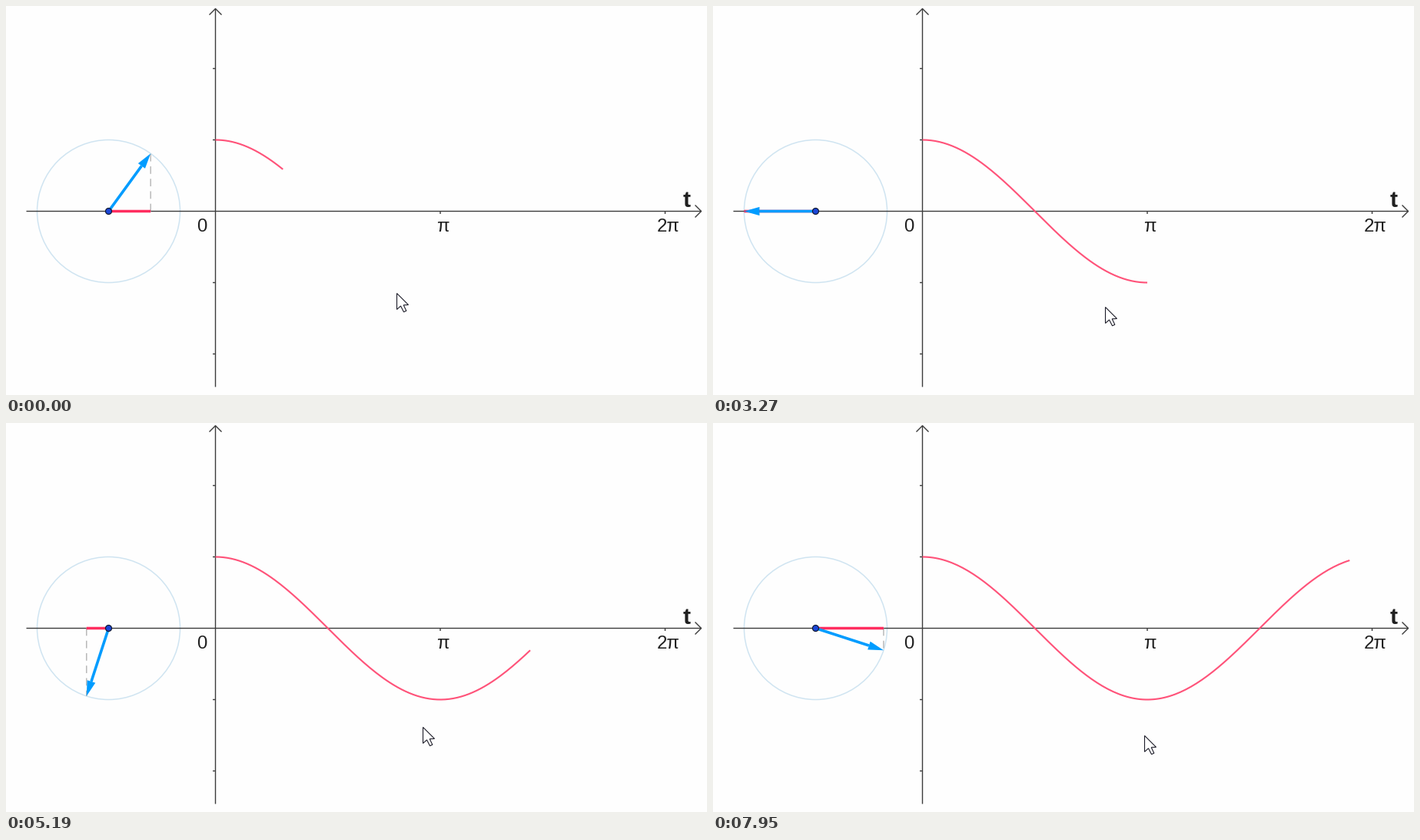
These frames come from a looping animation (912 px wide and 507 px high, 8000 ms). A matplotlib script:

```python
import numpy as np
import matplotlib.pyplot as plt
from matplotlib.animation import FuncAnimation
from matplotlib.patches import Circle, Polygon

W, H, DPI = 912, 507, 96
STEP_MS, LOOP_MS = 20, 8000
PX = 72 / DPI

CENTER = np.array([133.0, 267.0])
RADIUS = 93
ORIGIN_X, AXIS_Y, PI_PX = 272, 267, 292.5
INK, BLUE, RED, CURVE = "#3c3c3c", "#009cff", "#ff2d5f", "#ff5279"

# The angle grows by pi/10 at each of these times.
TURNS = [310, 800, 1260, 1780, 2280, 2750, 3270, 3770, 4230, 4710,
         5190, 5680, 6170, 6660, 7150, 7650]

# Mouse path: time, x, y.
MOUSE = np.array([
    (30, 508, 374), (640, 510, 391), (1779, 510, 391), (1780, 510, 392),
    (3960, 510, 392), (4620, 537, 396), (4770, 540, 396), (4819, 540, 396),
    (4820, 542, 396), (5529, 542, 396), (5530, 543, 396), (6049, 543, 396),
    (6050, 544, 396), (7150, 544, 396), (7650, 559, 406), (7799, 559, 406),
    (7800, 560, 406), (7949, 560, 406), (7950, 561, 407)])
POINTER = np.array([(0, 0), (0, 21), (5, 16.5), (9, 24.3), (12.3, 22.8),
                    (8.7, 15.3), (15, 15)])

fig = plt.figure(figsize=(W / DPI, H / DPI), dpi=DPI, facecolor="#fefefe")
ax = fig.add_axes([0, 0, 1, 1])
ax.set_xlim(-0.5, W - 0.5)
ax.set_ylim(H - 0.5, -0.5)
ax.axis("off")


def stroke(points, color, width, z, **style):
    xs, ys = zip(*points) if len(points) else ((), ())
    style.setdefault("solid_capstyle", "butt")
    line, = ax.plot(xs, ys, color=color, lw=width * PX, zorder=z,
                    snap=False, **style)
    return line


def label(x, baseline, text, size, **style):
    ax.text(x, baseline, text, fontsize=size * PX, color="#202020",
            family="Liberation Sans", va="baseline", ha="left", **style)


# Axes
stroke([(26, AXIS_Y), (904, AXIS_Y)], INK, 1.4, 2)
stroke([(ORIGIN_X, 496), (ORIGIN_X, 3)], INK, 1.4, 2)
stroke([(896, 259), (904, AXIS_Y), (896, 275)], INK, 1.4, 2)
stroke([(264, 11), (ORIGIN_X, 3), (280, 11)], INK, 1.4, 2)
for k in (-2, -1, 1, 2):
    y = AXIS_Y - k * RADIUS
    stroke([(268.5, y), (ORIGIN_X, y)], INK, 1.4, 2)
for k in (1, 2):
    x = ORIGIN_X + k * PI_PX
    stroke([(x, AXIS_Y), (x, 270.5)], INK, 1.4, 2)
label(248, 294, "0", 24)
label(559.5, 294, "π", 24)
label(846.5, 294, "2π", 24)
label(880.5, 261.5, "t", 30, weight="bold")

# Moving parts
ax.add_patch(Circle(CENTER, RADIUS, fill=False, ec="#cfe4f1", lw=1.5 * PX,
                    zorder=1))
curve = stroke([], CURVE, 2.1, 3, solid_joinstyle="round")
drop = stroke([], "#b4b4b4", 1.4, 3, dashes=(7, 4.6))
shadow = stroke([], RED, 3.5, 4)
shaft = stroke([], BLUE, 3.6, 5)
head = ax.add_patch(Polygon(np.zeros((3, 2)), fc=BLUE, ec="none", zorder=5))
ax.add_patch(Circle(CENTER, 4, fc="#1a46d8", ec="#101830", lw=1.2 * PX,
                    zorder=6))
pointer = ax.add_patch(Polygon(POINTER, fc="white", ec="#1c1c28",
                               lw=1.1 * PX, zorder=8))


def draw(i):
    t = i * STEP_MS + STEP_MS / 2
    angle = np.pi / 10 * (3 + sum(t >= turn for turn in TURNS))

    direction = np.array([np.cos(angle), -np.sin(angle)])
    side = np.array([-direction[1], direction[0]])
    tip = CENTER + RADIUS * direction
    neck = tip - 20 * direction
    shaft.set_data(*zip(CENTER, neck))
    head.set_xy([tip, neck + 5.6 * side, neck - 5.6 * side])
    shadow.set_data([CENTER[0], tip[0]], [AXIS_Y, AXIS_Y])
    drop.set_data([tip[0], tip[0]], [AXIS_Y, tip[1]])

    a = np.linspace(0, angle, 160)
    curve.set_data(ORIGIN_X + PI_PX * a / np.pi, AXIS_Y - RADIUS * np.cos(a))

    spot = [round(np.interp(t, MOUSE[:, 0], MOUSE[:, k])) for k in (1, 2)]
    pointer.set_xy(POINTER + spot)
    return curve, drop, shadow, shaft, head, pointer


anim = FuncAnimation(fig, draw, frames=LOOP_MS // STEP_MS, interval=STEP_MS,
                     repeat=True, repeat_delay=0, blit=False)
plt.show()
```
